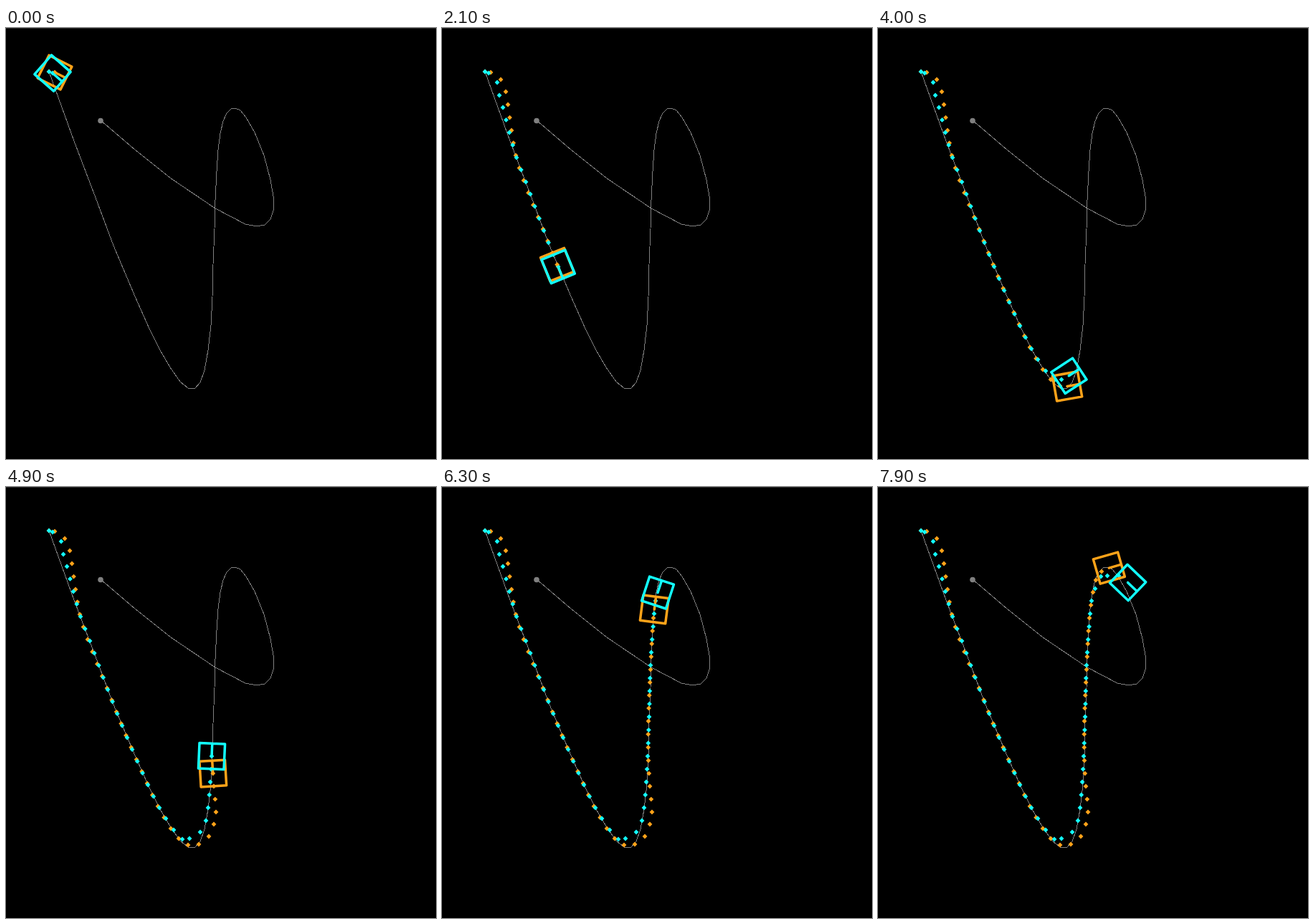
Write an HTML page that moves like this. It is 600x602 px and loops after 8 s.

```html
<!DOCTYPE html>
<html>
<head>
<meta charset="utf-8">
<style>
  html, body { margin: 0; width: 100%; height: 100%; overflow: hidden; background: #000; }
  svg { display: block; width: 100vw; height: 100vh; }
  .body { fill: none; stroke-width: 3.5; stroke-linejoin: round; stroke-linecap: round; }
</style>
</head>
<body>
<svg id="stage" viewBox="0 0 600 602">
  <rect width="600" height="602"/>
  <rect width="600" height="1" fill="#242424"/>
  <g shape-rendering="crispEdges">
    <polyline fill="none" stroke="#808080" points="60,61 95,158 125,237 150,304 180,375 200,420 215,450 229,474 243,494 254,503
      263,504 271,495 277,478 282,450 286,415 288,375 289,330 291,280 292,240 294,200 296,170 299,147 303,130
      308,119 314,113 320,112 327,115 335,125 347,146 360,178 369,212 373,235 373,255 369,267 361,275 350,277
      334,274 292,252 230,210 180,170 132,129"/>
  </g>
  <circle cx="132" cy="129.5" r="3.8" fill="#808080"/>
</svg>
<script>
const LOOP = 8000, TICK = 100, HALF = 17.8;

// [time, number of trail steps travelled]
const pace = [
  [0, 1], [100, 1], [700, 3], [800, 4], [1900, 14.67], [2100, 17], [2800, 23.67],
  [3100, 26.67], [3400, 27.67], [3500, 27.67], [4000, 28.67], [4200, 29.67],
  [4400, 31.33], [4900, 35], [6100, 47], [6300, 47.67], [7100, 49.33], [7900, 51.67]
];

// [step, x, y] along each robot's route
const orangeRoute = [
  [0, 60, 61], [1, 68, 62], [2, 82, 72], [3, 89, 89], [4, 92, 107], [6, 97, 143], [8, 103, 178],
  [10, 114, 213], [14, 141, 281], [18, 167.5, 347], [22, 197, 414], [24, 212, 446], [26, 230, 477],
  [27, 241, 491], [28, 254, 500], [29, 269, 499], [30, 283, 488], [31, 290, 471], [32, 293, 454],
  [34, 290, 418], [36, 288, 382], [39, 288, 327], [43, 291, 255], [47, 295, 183], [49, 300, 147],
  [50, 304, 130], [51, 312, 118], [52, 328, 112], [53, 345, 115]
];
const cyanRoute = [
  [0, 60, 61], [1, 65, 63], [2, 77, 76], [3, 80, 94], [4, 85, 111], [6, 94, 146], [8, 104, 181],
  [10, 117, 215], [14, 142, 283], [18, 169, 350], [22, 198, 416], [24, 214, 448], [25, 223, 463],
  [26, 234, 479], [27, 246, 492], [28, 256, 491], [29, 271, 482], [30, 279, 466], [31, 282, 448],
  [33, 285, 412], [35, 287, 376], [38, 289, 321], [42, 291, 249], [46, 296, 177], [47, 298, 159],
  [48, 303, 142], [49, 311, 125], [50, 320, 124], [51, 336, 124], [52, 354, 139], [53, 364, 155]
];

const stage = document.getElementById('stage');

function add(tag, attrs) {
  const el = document.createElementNS('http://www.w3.org/2000/svg', tag);
  for (const k in attrs) el.setAttribute(k, attrs[k]);
  return stage.appendChild(el);
}

function segment(keys, v) {
  let k = 0;
  while (k < keys.length - 2 && keys[k + 1][0] <= v) k++;
  return k;
}

function stepsAt(t) {
  const k = segment(pace, t), [t0, a] = pace[k], [t1, b] = pace[k + 1];
  return a + (b - a) * (t - t0) / (t1 - t0);
}

function slope(route, k, axis) {
  const a = route[Math.max(k - 1, 0)], b = route[Math.min(k + 1, route.length - 1)];
  return (b[axis] - a[axis]) / (b[0] - a[0]);
}

// Cubic Hermite: value and derivative on one axis
function spline(route, s, axis) {
  const k = segment(route, s), a = route[k], b = route[k + 1];
  const h = b[0] - a[0], u = (s - a[0]) / h, d = b[axis] - a[axis];
  const m = slope(route, k, axis) * h, n = slope(route, k + 1, axis) * h;
  const c2 = 3 * d - 2 * m - n, c3 = m + n - 2 * d;
  return [a[axis] + u * (m + u * (c2 + u * c3)), m + u * (2 * c2 + 3 * u * c3)];
}

function pose(route, s) {
  const [x, dx] = spline(route, s, 1), [y, dy] = spline(route, s, 2);
  return { x, y, angle: Math.atan2(dy, dx) * 180 / Math.PI };
}

function makeRobot(route, color) {
  return { route, trail: add('path', { fill: color }), body: null, color };
}

const robots = [makeRobot(orangeRoute, '#ffa319'), makeRobot(cyanRoute, '#12ffff')];
for (const r of robots) {
  r.body = add('path', {
    class: 'body', stroke: r.color,
    d: `M${-HALF},${-HALF}H${HALF}V${HALF}H${-HALF}ZM0,0H${HALF}`
  });
}

function render(t) {
  const s = stepsAt(t);
  for (const r of robots) {
    let d = '';
    for (let i = 0; i <= s; i++) {
      const p = pose(r.route, i);
      d += `M${p.x},${p.y - 3.4}l3.4,3.4l-3.4,3.4l-3.4,-3.4z`;
    }
    r.trail.setAttribute('d', d);
    const { x, y, angle } = pose(r.route, s);
    r.body.setAttribute('transform', `translate(${x} ${y}) rotate(${angle})`);
  }
}

const start = performance.now();
function frame() {
  const t = (performance.now() - start) % LOOP;
  render(Math.floor(t / TICK) * TICK);
  requestAnimationFrame(frame);
}
frame();
</script>
</body>
</html>
```
